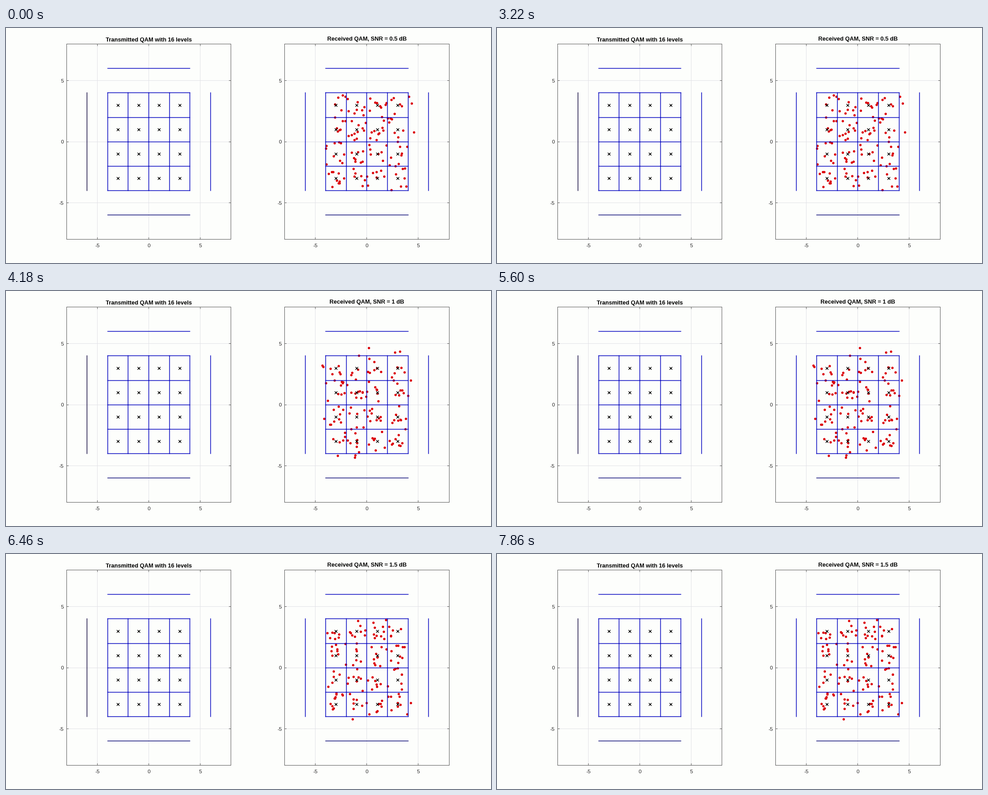
Animation, 1075 px wide and 521 px high, one loop 8000 ms. Source, as a matplotlib script:

```python
import matplotlib.pyplot as plt
import numpy as np
from matplotlib.animation import FuncAnimation

W, H, DPI = 1075, 521, 100
PX = 72 / DPI                      # points per pixel
STEP, LOOP = 20, 8000              # ms
SX, SY, CY = 22.81, 27.06, 252.2   # pixels per unit, vertical centre
LEFT, RIGHT = 316.5, 799.9         # horizontal centres of the two plots
LEVELS = np.array([-3, -1, 1, 3])
PER_SYMBOL = 8
BLUE = "#0000c0"

STAGES = [(0, 0.5), (3240, 1), (6460, 1.5)]   # start in ms, SNR in dB

fig = plt.figure(figsize=(W / DPI, H / DPI), dpi=DPI, facecolor="#fdfefc")
ax = fig.add_axes([0, 0, 1, 1])
ax.set(xlim=(0, W), ylim=(H, 0))
ax.axis("off")

gx, gy = (g.ravel() for g in np.meshgrid(LEVELS, LEVELS))


def pixel(v):
    return np.floor(v) + 0.5


def lines(cx, segments, color, width=1.5, z=3):
    """Draw (x0, y0, x1, y1) segments, given in plot units, as one path."""
    xs, ys = [], []
    for x0, y0, x1, y1 in segments:
        xs += [pixel(cx + x0 * SX), pixel(cx + x1 * SX), np.nan]
        ys += [pixel(CY - y0 * SY), pixel(CY - y1 * SY), np.nan]
    ax.plot(xs, ys, color=color, lw=width * PX, snap=False, zorder=z)


def label(x, y, s, size=11.5, ha="center", **kw):
    return ax.text(x, y, s, fontsize=size * PX, ha=ha, va="baseline",
                   family="Liberation Sans", **kw)


def title(cx, y, s):
    return label(cx, y, s, 12.7, weight="bold", color="black")


def draw_plot(cx, left_color):
    lines(cx, [s for v in (-5, 0, 5) for s in ((v, -8, v, 8), (-8, v, 8, v))],
          "#e1e1e6", 1, 1)

    tx, ty = 4 / SX, 4 / SY
    frame = [(-8, -8, 8, -8), (-8, 8, 8, 8), (-8, -8, -8, 8), (8, -8, 8, 8)]
    for v in (-5, 0, 5):
        frame += [(v, -8, v, -8 + ty), (v, 8, v, 8 - ty),
                  (-8, v, -8 + tx, v), (8, v, 8 - tx, v)]
        label(cx + v * SX, 486, str(v), color="#262626")
        label(cx - 8 * SX - 6, CY - v * SY + 4, str(v), ha="right", color="#262626")
    lines(cx, frame, "#555555", 1, 2)

    grid = [s for v in range(-4, 5, 2) for s in ((v, -4, v, 4), (-4, v, 4, v))]
    lines(cx, grid + [(-4, 6, 4, 6), (6, -4, 6, 4)], BLUE)
    lines(cx, [(-4, -6, 4, -6)], "#0a0a78")
    lines(cx, [(-6, -4, -6, 4)], left_color)
    ax.plot(cx + gx * SX, CY - gy * SY, "x", color="black",
            ms=5.4 * PX, mew=1.4 * PX, zorder=5)


def noisy_symbols(snr, seed):
    """Every symbol received several times with Gaussian noise."""
    rng = np.random.default_rng(seed)
    noise = rng.normal(0, 0.7 * 10 ** (-snr / 20), (2, PER_SYMBOL, gx.size))
    return RIGHT + (gx + noise[0]).ravel() * SX, CY - (gy + noise[1]).ravel() * SY


draw_plot(LEFT, "#140a40")
draw_plot(RIGHT, BLUE)
title(LEFT - 0.4, 30, "Transmitted QAM with 16 levels")
received = title(RIGHT, 28, "")
dots, = ax.plot([], [], "o", color="#dc0008", ms=5.3 * PX, mew=0, zorder=2.5)
clouds = [noisy_symbols(snr, seed) for seed, (_, snr) in enumerate(STAGES, 16)]


def update(i):
    k = sum(i * STEP >= start for start, _ in STAGES) - 1
    dots.set_data(*clouds[k])
    received.set_text(f"Received QAM, SNR = {STAGES[k][1]} dB")
    return dots, received


anim = FuncAnimation(fig, update, frames=LOOP // STEP, interval=STEP,
                     repeat=True, repeat_delay=0)
plt.show()
```
